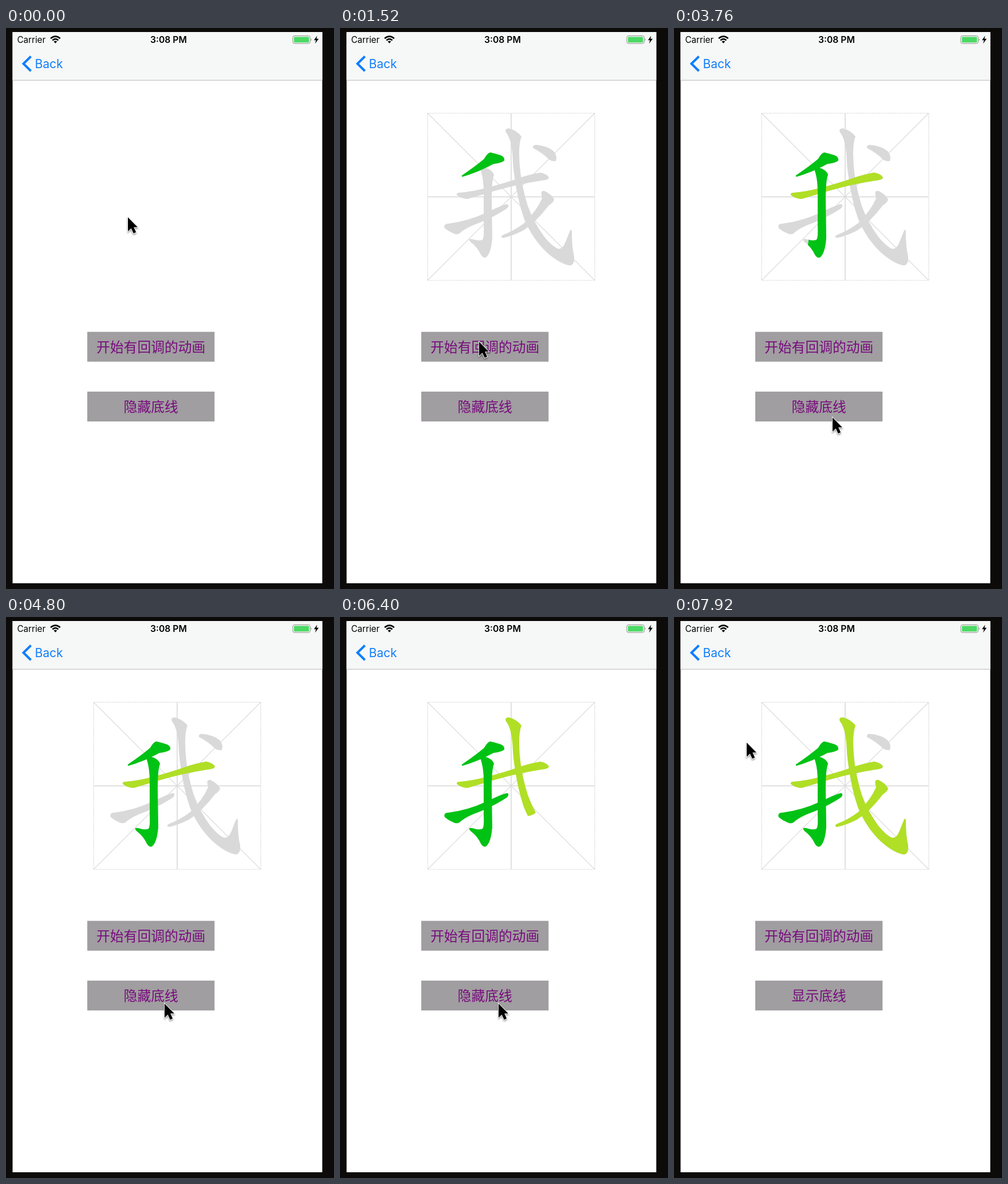
An HTML page for the animation above (8000 ms loop, 573 px wide and 978 px high).

```html
<!DOCTYPE html>
<html lang="zh">
<head>
<meta charset="utf-8">
<title>Stroke order</title>
<style>
  html, body { margin: 0; width: 100%; height: 100%; overflow: hidden; background: #0c0b09; }
  svg { display: block; width: 573px; height: 978px; }
  text { font-family: Inter, Roboto, sans-serif; }
  .button { fill: #a09ea0; }
  .label { font: 23.8px "Noto Sans CJK SC", "Noto Sans CJK", sans-serif; fill: #780b7d; text-anchor: middle; }
  .brush { fill: none; stroke-width: 46; stroke-linecap: round; stroke-linejoin: round; }
  #cursor { filter: drop-shadow(0 2px 1.5px rgba(0, 0, 0, .4)); }
</style>
</head>
<body>
<svg viewBox="0 0 573 978">
  <defs id="outlines">
    <path d="M213 257Q238 240 252 228Q258 217 263 217Q272 219 281 222Q288 225 287 231Q283 235 268 237Q240 252 215 259Q212 260 213 257Z"/>
    <path d="M204 291Q203 287 210 287Q240 285 300 266Q330 255 350 252Q363 255 365 261Q364 265 352 266Q312 272 270 284Q240 293 223 298Q212 298 204 291Z"/>
    <path d="M245 246Q250 242 258 245Q268 250 269 256Q265 266 265 300L266 366Q264 393 255 400Q250 402 246 395Q240 382 228 373Q222 367 231 368Q244 372 249 369Q252 366 251 345V285Q251 262 245 246Z"/>
    <path d="M183 349Q180 341 190 341Q225 337 262 319Q284 308 292 307Q297 309 291 315Q265 332 232 344Q216 351 209 358Q204 361 198 358Q190 355 183 349Z"/>
    <path d="M290 182Q287 175 295 175Q308 178 317 189Q313 200 313 218Q313 262 328 310Q338 338 357 364Q371 381 381 385Q389 386 394 373L402 353Q405 349 405 357Q405 382 409 398Q410 413 402 414Q385 412 361 391Q335 366 321 331Q307 290 302 235Q301 195 290 182Z"/>
    <path d="M352 291Q350 283 357 284Q370 290 374 299Q373 304 365 309Q343 338 320 353Q300 363 285 366Q279 365 284 361Q305 353 322 340Q344 318 353 297Z"/>
    <path d="M337 209Q336 203 345 204Q367 207 375 217Q380 225 377 232Q372 233 366 230Q354 218 337 209Z"/>
  </defs>

  <rect width="573" height="978" fill="#0c0b09"/>
  <rect x="11.5" y="7" width="541" height="961" fill="#fff"/>
  <rect x="11.5" y="7" width="541" height="84" fill="#f6f7f7"/>
  <path d="M11.5 91.2H552.5" stroke="#c4c4c5" stroke-width="1.3"/>

  <text x="19.5" y="26" font-size="15.2">Carrier</text>
  <g fill="none" stroke="#000" stroke-width="2.6">
    <path d="M78 18.2Q86.3 11 94.6 18.2M81.2 21.4Q86.3 17 91.4 21.4"/>
    <path d="M83.4 23.6Q86.3 21.4 89.2 23.6L86.3 26.8Z" fill="#000" stroke="none"/>
  </g>
  <text x="284" y="26.2" font-size="15.7" font-weight="600" text-anchor="middle">3:08 PM</text>
  <rect x="501" y="13.6" width="30.4" height="13.4" rx="3" fill="none" stroke="#8c8f8e"/>
  <rect x="503" y="15.4" width="26.4" height="9.8" rx="1.5" fill="#4cd964"/>
  <path d="M532.8 18Q535 20.2 532.8 22.6Z" fill="#8c8f8e"/>
  <path d="M543.5 13.5L538 21.2H541.5L540 27.2L546.2 18.8H542.4Z"/>

  <path d="M43.5 49.5L30.5 62.2L43.5 75" fill="none" stroke="#107efb" stroke-width="4"/>
  <text x="50.5" y="70" font-size="21" fill="#107efb">Back</text>

  <g id="board">
    <g fill="none" stroke="#dcdcdc" stroke-width="1.2">
      <path d="M153 148.5L445 440M445 148.5L153 440"/>
      <path d="M299 148.5V440M153 294.3H445" stroke-width="1.7"/>
      <rect x="153" y="148.5" width="292" height="291.5" stroke-dasharray="3 1"/>
    </g>
    <g id="base" fill="#d9d9d9"></g>
    <g id="ink"></g>
  </g>

  <rect class="button" x="142" y="529.7" width="222.3" height="52"/>
  <text class="label" x="253.2" y="564.7">开始有回调的动画</text>
  <rect class="button" x="142" y="633.9" width="222.3" height="52"/>
  <text class="label" id="toggle" x="253.2" y="669">隐藏底线</text>

  <path id="cursor" d="M0 0V24.5L5.7 19.2L9.8 28L14.2 26L10.2 17.3H17Z" stroke="#fff" stroke-width="1.8" paint-order="stroke"/>
</svg>
<script>
const LOOP = 8000, STEP = 80;
const SHOW_BOARD = 800, HIDE_BASE = 5640, SHOW_BASE = 7040;
const GREEN = '#00c214', LIME = '#b0df26';

// Brush path, colour, start and end time of each written stroke
const strokes = [
  ['M285 228L264 226L214 258', GREEN, 920, 1330],
  ['M206 290L222 292L362 259', LIME, 1900, 2600],
  ['M252 245L258 265V372Q257 388 250 388L228 370', GREEN, 3200, 3920],
  ['M185 345L205 350L293 309', GREEN, 4800, 5240],
  ['M295 180Q307 188 307 220Q308 270 327 325Q345 372 395 402L404 353', LIME, 5920, 6900],
  ['M355 287L362 302Q338 342 283 364', LIME, 7440, 7880]
];

// Cursor moves: start, end, destination
const cursorStart = [213, 330];
const moves = [
  [80, 720, 243, 547],
  [1680, 2640, 277, 679],
  [4240, 4480, 277, 674],
  [7320, 7900, 127, 219]
];

const byId = id => document.getElementById(id);
const clamp = x => Math.min(1, Math.max(0, x));
const smooth = x => x * x * (3 - 2 * x);

function addSvg(parent, tag, attrs) {
  const node = document.createElementNS(parent.namespaceURI, tag);
  for (const name in attrs) node.setAttribute(name, attrs[name]);
  return parent.appendChild(node);
}

const brushes = [];
[...byId('outlines').children].forEach((outline, i) => {
  const d = outline.getAttribute('d');
  addSvg(byId('base'), 'path', { d });
  if (!strokes[i]) return;
  const [brush, color] = strokes[i];
  const clip = addSvg(byId('outlines'), 'clipPath', { id: 'clip' + i });
  addSvg(clip, 'path', { d });
  brushes.push(addSvg(byId('ink'), 'path', {
    d: brush, class: 'brush', stroke: color, pathLength: 1, 'clip-path': `url(#clip${i})`
  }));
});

function cursorAt(t) {
  let [x, y] = cursorStart;
  for (const [start, end, toX, toY] of moves) {
    const k = smooth(clamp((t - start) / (end - start)));
    x += (toX - x) * k;
    y += (toY - y) * k;
  }
  return [x, y];
}

function show(node, visible) {
  node.style.display = visible ? '' : 'none';
}

function render(t) {
  show(byId('board'), t >= SHOW_BOARD);
  show(byId('base'), t < HIDE_BASE || t >= SHOW_BASE);
  byId('toggle').textContent = t < SHOW_BASE ? '隐藏底线' : '显示底线';
  brushes.forEach((brush, i) => {
    const [, , start, end] = strokes[i];
    const progress = clamp((t - start) / (end - start));
    show(brush, progress > 0);
    brush.setAttribute('stroke-dasharray', `${progress} 2`);
  });
  byId('cursor').setAttribute('transform', `translate(${cursorAt(t)})`);
}

function tick() {
  const t = performance.now() % LOOP;
  render(Math.floor(t / STEP) * STEP);
  requestAnimationFrame(tick);
}
tick();
</script>
</body>
</html>
```
